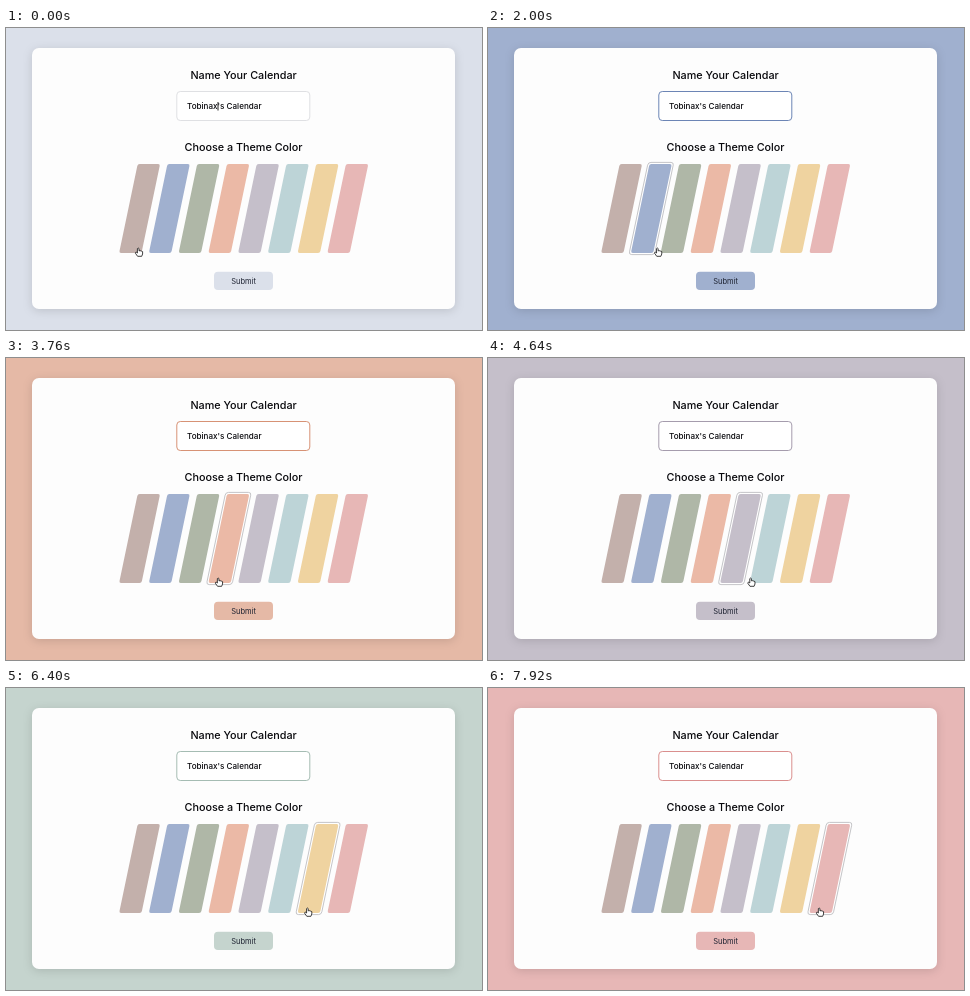
Recreate the animation shown at these times as an HTML page. Size 476 px wide and 302 px high, loop 8 s.

```html
<!DOCTYPE html>
<html lang="en">
<head>
<meta charset="utf-8">
<title>Calendar theme picker</title>
<style>
  html, body { margin: 0; width: 100%; height: 100%; overflow: hidden; }
  svg { display: block; width: 476px; height: 302px; font: 500 10.8px Inter, sans-serif; fill: #08080c; }
  .card { fill: #fdfdfd; filter: drop-shadow(0 2px 5px rgba(0, 0, 0, .13)); }
  .mid { text-anchor: middle; }
  .ring { fill: #fff; stroke: #b9b9bd; stroke-width: .8; }
</style>
</head>
<body>
<svg viewBox="0 0 476 302">
  <rect id="page" width="476" height="302"/>
  <rect class="card" x="26" y="20" width="423" height="261" rx="7"/>
  <text class="mid" x="237.6" y="50.8">Name Your Calendar</text>
  <rect id="field" x="170.8" y="63.5" width="133" height="29" rx="3.5" fill="#fff"/>
  <text x="181" y="81.2" font-size="8.1">Tobinax's Calendar</text>
  <path id="caret" d="M212 74v8.5" stroke="#222"/>
  <text class="mid" x="237.5" y="123.2">Choose a Theme Color</text>
  <g id="swatches"></g>
  <rect id="button" x="208" y="243.7" width="59" height="18.3" rx="4"/>
  <text class="mid" x="237.5" y="256" font-size="7.5" font-weight="400" fill="#1c2130">Submit</text>
  <path id="hand" fill="#fff" stroke="#111" stroke-width=".8" stroke-linejoin="round"
    d="M-1.6 1V-3.4Q-.8-4.6 0-3.4V-1.2L1.2-1.3 2.4-.9 3.6-.4V2L2.7 4.3H-1.4L-3.6 1.2Q-3.6 0-2.6.2Z"/>
</svg>
<script>
const LOOP = 8000, STEP = 80, FADE = 240, GAP = 29.75;
const $ = id => document.getElementById(id);
const rgb = hex => [1, 3, 5].map(i => parseInt(hex.slice(i, i + 2), 16));
const idle = rgb('#dbe0ea');
const colors = ['#c3b0ab', '#a0b0cf', '#afb7a7', '#ebb9a6',
                '#c5bfca', '#bdd4d7', '#efd3a0', '#e7b7b6'].map(rgb);
const clicks = [720, 1240, 2700, 3595, 4300, 4900, 6380, 6900];

const box = (grow, attrs) =>
  `<rect x="${-11.2 - grow}" y="${-44.5 - grow}" width="${22.4 + 2 * grow}" height="${89 + 2 * grow}" rx="${2 + grow / 2}" ${attrs}/>`;
$('swatches').innerHTML = colors.map((color, i) =>
  `<g transform="translate(${133.6 + GAP * i} 180.5) skewX(-11.8)">` +
  box(1.6, 'class="ring"') + box(0, `fill="rgb(${color})"`) + '</g>').join('');
const rings = document.querySelectorAll('.ring');

const clamp = p => Math.max(0, Math.min(1, p));
const lerp = (a, b, p) => a + (b - a) * p;
const mix = (a, b, p) => `rgb(${a.map((v, i) => Math.round(lerp(v, b[i], p)))})`;
const smooth = p => p * p * (3 - 2 * p);
const deepen = color => color.map(v => v - (255 - v) * .55);
const stopX = i => Math.max(133, 123.7 + GAP * i);

// The pointer crosses to the next swatch in the middle half of the wait
function pointerX(t, active) {
  if (active < 0 || active === colors.length - 1) return stopX(active);
  const wait = (t - clicks[active]) / (clicks[active + 1] - clicks[active]);
  return lerp(stopX(active), stopX(active + 1), smooth(clamp(wait * 2 - .5)));
}

function draw(t) {
  const active = clicks.filter(at => at <= t).length - 1;
  const color = colors[active] || idle, before = colors[active - 1] || idle;
  const p = active < 0 ? 1 : 1 - (1 - clamp((t - clicks[active]) / FADE)) ** 2;
  $('page').style.fill = $('button').style.fill = mix(before, color, p);
  $('field').style.stroke = active < 0 ? '#dfe0e3' : mix(deepen(before), deepen(color), p);
  $('caret').style.opacity = t < 320 ? 1 : 0;
  rings.forEach((ring, i) => ring.style.opacity = i === active ? 1 : 0);
  $('hand').setAttribute('transform', `translate(${pointerX(t, active)} 224)`);
}

const start = performance.now();
function tick() {
  const t = (performance.now() - start) % LOOP;
  draw(Math.floor(t / STEP) * STEP);
  requestAnimationFrame(tick);
}
tick();
</script>
</body>
</html>
```
